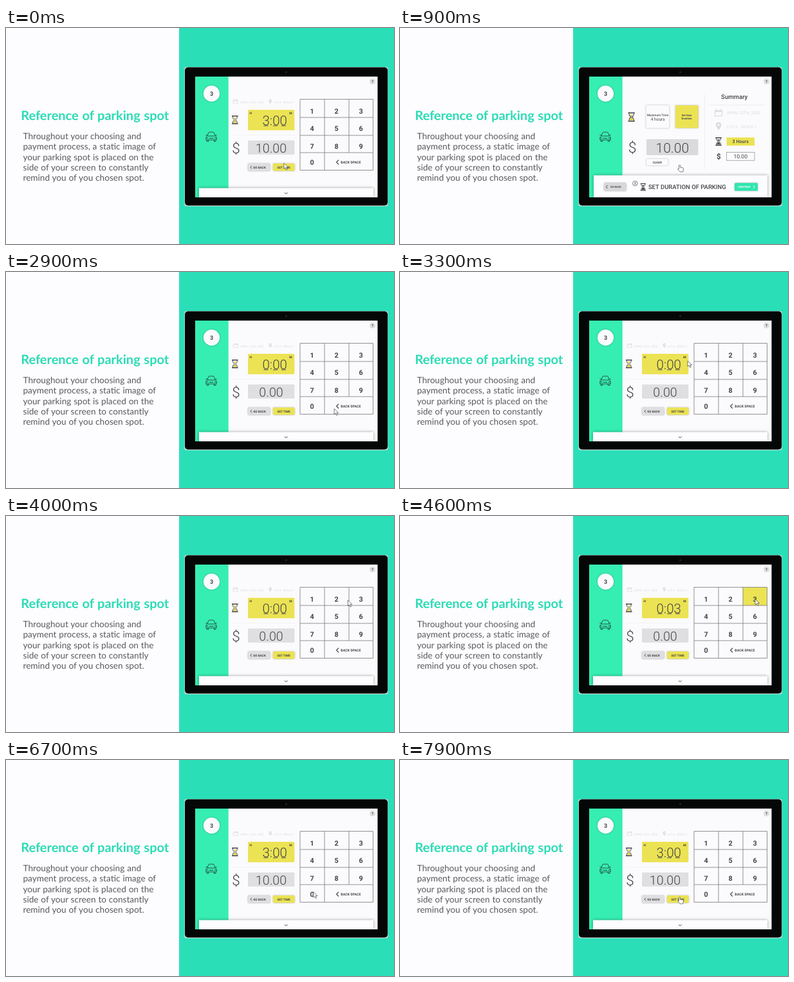
Write an HTML page that moves like this. It is 603 px wide and 338 px high and loops after 8000 ms.

```html
<!DOCTYPE html>
<html lang="en">
<head>
<meta charset="utf-8">
<title>Parking kiosk</title>
<style>
  html, body { margin: 0; width: 100%; height: 100%; overflow: hidden; background: #2adfb8; }
  svg { display: block; width: 603px; height: 338px; text-rendering: geometricPrecision; }
  text { font-family: Roboto, sans-serif; fill: #454548; }
  .copy text { font-family: Nunito, Lato, sans-serif; }
  .soft { filter: drop-shadow(.5px .8px .9px rgba(0, 0, 0, .32)); }
  .drawer { filter: drop-shadow(0 0 2px rgba(0, 0, 0, .4)); }
</style>
</head>
<body>
<svg id="stage" viewBox="0 0 603 338"></svg>
<script>
const LOOP = 8000;
const YELLOW = '#ebe353', GRAY = '#dfdee0', INK = '#454548', PALE = '#dcdcdf', GREEN = '#36eeb1', PAPER = '#fbfafc';

const rect = (x, y, w, h, fill, extra = '') =>
  `<rect x="${x}" y="${y}" width="${w}" height="${h}" fill="${fill}" ${extra}/>`;
const line = (d, color = INK, width = .8, extra = '') =>
  `<path d="${d}" fill="none" stroke="${color}" stroke-width="${width}" ${extra}/>`;
const label = (x, y, size, str, { weight = 400, anchor = 'middle', fill = INK, id = '' } = {}) =>
  `<text x="${x}" y="${y}" font-size="${size}" font-weight="${weight}" text-anchor="${anchor}"
    style="fill:${fill}" ${id && `id="${id}"`}>${str}</text>`;
const group = (inner, attrs) => `<g ${attrs}>${inner}</g>`;
const place = (x, y, scale, inner) => group(inner, `transform="translate(${x} ${y}) scale(${scale})"`);

const hourglass = (x, y, s, sand = '#d8c93c') => place(x, y, s,
  `<path d="M2 12Q2 9.5 5 7.5Q8 9.5 8 12Z M2.6 3.6H7.4L5 6.5Z" fill="${sand}"/>` +
  line('M0 .7H10M0 13.3H10', INK, 1.5) +
  line('M1.5 1V3.5Q2 5.5 4.3 7Q2 8.5 1.5 10.5V13M8.5 1V3.5Q8 5.5 5.7 7Q8 8.5 8.5 10.5V13', INK, 1));
const calendar = (x, y, s) => place(x, y, s,
  line('M.6 2H11.4V10.4H.6ZM.6 3.6H11.4M3 0V2.5M9 0V2.5', PALE, 1.3));
const pin = (x, y, s) => place(x, y, s,
  `<path d="M4 12Q0 7 0 4A4 4 0 0 1 8 4Q8 7 4 12ZM4 2.4A1.6 1.6 0 1 0 4 5.6A1.6 1.6 0 1 0 4 2.4Z"
    fill="${PALE}" fill-rule="evenodd"/>`);

function tablet() {
  return rect(277.3, 61, 316.4, 218, '#bcd8d1', 'rx="3"') +
    rect(278, 61.6, 315.2, 216.2, '#050606', 'rx="5"') +
    '<circle cx="435.5" cy="69" r="1.5" fill="#24272b"/>' +
    rect(294, 76, 283.5, 189, PAPER) +
    rect(294, 76, 51.7, 189, GREEN) +
    `<circle class="soft" cx="319.5" cy="102.7" r="12.6" fill="${PAPER}"/>` +
    label(319.5, 106, 9, '3', { weight: 700 }) +
    place(310, 162, 1,
      line('M2.6 7L4.7 2Q5 1 6.2 1H11.8Q13 1 13.3 2L15.4 7M2.6 7H15.4Q17.2 8 17.2 10V13H.8V10Q.8 8 2.6 7' +
        'ZM2 13V15.4H4.8V13M13.2 13V15.4H16V13M2.5 5.5H.4M15.5 5.5H17.6M6 10.5H12M1 9.5L4.5 10.5M17 9.5L13.5 10.5',
        '#26524a', 1)) +
    '<circle cx="569.5" cy="83.7" r="4" fill="#e3e3e5" stroke="#c4c4c7" stroke-width=".5"/>' +
    label(569.5, 85.9, 6, '?', { weight: 700 });
}

function keypad() {
  const cols = [457, 495, 533, 570.5], rows = [111.5, 140, 168, 195, 222.5];
  const key = (c, r, id) => rect(cols[c], rows[r], cols[c + 1] - cols[c], rows[r + 1] - rows[r], YELLOW, `id="${id}"`);
  let out = calendar(353, 111.5, .62) + pin(408.5, 111.5, .58) +
    label(364, 117.6, 4.5, 'APRIL 12TH, 2020', { anchor: 'start', fill: PALE }) +
    label(415.5, 117.6, 4.5, 'LOT X - SPACE 1', { anchor: 'start', fill: PALE }) +
    hourglass(351, 137, .96) +
    rect(376, 128, 72.3, 32, YELLOW, 'rx="1.5"') +
    label(380.3, 134.8, 5, 'H', { weight: 700 }) + label(442.5, 134.8, 5, 'M', { weight: 700 }) +
    label(417.7, 152, 20.6, '', { weight: 300, id: 'time' }) +
    line('M400.5 153H407.5M415 153H422M428 153H435', INK, .9) +
    line('M352 167.5H449', '#eeeef0', .6) +
    label(357.5, 196, 22.5, '$', { weight: 300 }) +
    rect(376, 176, 72.3, 22, GRAY, 'rx="1.5"') +
    label(412, 194.6, 19.7, '', { weight: 300, id: 'price' }) +
    rect(376, 212, 34.5, 11.6, GRAY, 'rx="1.5" class="soft"') +
    line('M382 215.8L380 218L382 220.2', INK, .9) +
    label(394, 219.9, 4.7, 'GO BACK', { weight: 700 }) +
    rect(415, 212, 33.5, 11.6, YELLOW, 'rx="1.5" class="soft"') +
    label(431.7, 219.9, 4.7, 'SET TIME', { weight: 700 }) +
    key(2, 0, 'three') + key(0, 3, 'zero') +
    line(rows.map(y => `M457 ${y}H570.5`).join('') +
      'M457 111.5V222.5M495 111.5V222.5M533 111.5V195M570.5 111.5V222.5', '#77777b', .8);
  for (let n = 1; n <= 9; n++) {
    const c = (n - 1) % 3, r = (n - 1 - c) / 3;
    out += label(475.7 + 38 * c, 134.3 + 27.1 * r, 10.8, n, { weight: 600 });
  }
  return out + label(475.7, 214.4, 10.8, '0', { weight: 600 }) +
    line('M517 206.5L513.5 210L517 213.5', INK, 1.1) +
    label(520.3, 211.7, 5.3, 'BACK SPACE', { weight: 700, anchor: 'start' }) +
    group(rect(300, 250.5, 271, 14.5, '#fdfcfe'), 'class="drawer" clip-path="url(#screen)"') +
    line('M433 257.5L435.3 259.6L437.6 257.5', INK, 1);
}

function summary() {
  return hourglass(354.5, 132, 1.04) +
    rect(382.5, 121, 36, 35.5, PAPER, 'rx="1" class="soft"') +
    label(400.5, 137.7, 4.75, 'Maximum Time', { weight: 500 }) + label(400.7, 145, 6.6, '4 hours') +
    rect(428, 121, 35.5, 35.5, YELLOW, 'rx="1" class="soft"') +
    label(445.6, 137.6, 4.2, 'Set Own', { weight: 600 }) + label(445.6, 142.9, 4.2, 'Duration', { weight: 600 }) +
    label(361.2, 195.2, 23, '$', { weight: 300 }) +
    rect(383, 174, 80.5, 25, '#dad9db', 'rx="2"') +
    label(423.3, 194.6, 21, '10.00', { weight: 300 }) +
    rect(383, 205, 33.5, 10, PAPER, 'rx="1" class="soft"') +
    label(399.8, 211.7, 4.6, 'CLEAR', { weight: 700 }) +
    line('M473.5 104V221M481 120.5H567', '#e9e9eb', .7) +
    label(519.7, 111.4, 9.6, 'Summary', { weight: 500 }) +
    calendar(489, 127, 1.02) + pin(491, 147.5, 1.03) +
    label(508, 135.3, 6.4, 'APRIL 12TH, 2020', { anchor: 'start', fill: PALE }) +
    label(508, 156.6, 6.4, 'LOT X - SPACE 1', { anchor: 'start', fill: PALE }) +
    hourglass(490.3, 171, .95, INK) +
    rect(507.5, 171.3, 43.5, 12.7, YELLOW) + label(529.2, 180.3, 7.2, '3 Hours', { weight: 500 }) +
    label(495.3, 205, 11.5, '$', { weight: 600 }) +
    rect(507.5, 194.6, 43.5, 12.6, PAPER, 'stroke="#88888c" stroke-width=".7"') +
    label(529.2, 203.9, 8.6, '10.00') +
    group(rect(301, 230.5, 270, 34.5, '#fdfcfe'), 'class="drawer" clip-path="url(#screen)"') +
    rect(317, 242.3, 34.5, 12.6, '#d8d7d9', 'rx="1.5" class="soft"') +
    line('M322.5 246L320.3 248.5L322.5 251', INK, 1) +
    label(335.5, 250, 4, 'GO BACK', { weight: 700 }) +
    `<circle cx="365.4" cy="243.2" r="3.8" fill="none" stroke="${INK}" stroke-width=".7"/>` +
    label(365.4, 245.2, 5.2, '2', { weight: 600 }) +
    hourglass(373.7, 243, .83, INK) +
    label(446.3, 251.7, 9.5, 'SET DURATION OF PARKING', { weight: 500 }) +
    rect(520, 242.6, 36, 12.2, '#2fe6ae', 'rx="1.5" class="soft"') +
    label(535, 250.1, 4, 'CONTINUE', { weight: 700, fill: '#fdfcfe' }) +
    line('M548.8 246.2L551.2 248.7L548.8 251.2', '#fdfcfe', 1);
}

const title = `<text x="23.2" y="144" font-size="20" font-weight="700" word-spacing=".8"
  style="fill:#2adcb5">Reference of parking spot</text>`;
const body = ['Throughout your choosing and', 'payment process, a static image of',
  'your parking spot is placed on the', 'side of your screen to constantly', 'remind you of you chosen spot.']
  .map((str, i) => `<text x="26.5" y="${174 + 16.3 * i}" font-size="13.6" word-spacing=".4"
    style="fill:#5a595d">${str}</text>`).join('');

const stage = document.getElementById('stage');
stage.innerHTML = `<clipPath id="screen">${rect(294, 76, 283.5, 189, '#000')}</clipPath>` +
  rect(0, 0, 603, 338, '#2adfb8') + rect(0, 0, 269, 338, '#fdfcfe') +
  group(title + body, 'class="copy"') + tablet() +
  group(keypad(), 'id="keypad"') + group(summary(), 'id="summary"') +
  group(
    `<path id="arrow" d="M0 0V9L2.1 7.1L3.6 10.4L5.2 9.7L3.7 6.5H6.5Z" fill="#fff" stroke="#444" stroke-width=".7"/>
     <path id="hand" d="M1 1Q2.2 -.5 3.2 1V4.2L7.2 5Q8.3 5.4 8.1 6.8L7.2 11H2.8L-.8 7.2Q-.8 5.8 1 6.6Z"
       fill="#fff" stroke="#444" stroke-width=".7"/>`, 'id="cursor"');

const el = Object.fromEntries([...stage.querySelectorAll('[id]')].map(n => [n.id, n]));

// [start ms, view, time, price, pressed key]
const states = [
  [0, 'keypad', '3:00', '10.00', ''],
  [300, 'summary', '3:00', '10.00', ''],
  [2700, 'keypad', '0:00', '0.00', ''],
  [4300, 'keypad', '0:03', '0.00', 'three'],
  [4900, 'keypad', '0:03', '0.00', ''],
  [5300, 'keypad', '0:30', '0.00', 'zero'],
  [6200, 'keypad', '3:00', '10.00', 'zero'],
  [6700, 'keypad', '3:00', '10.00', '']
];
// [ms, x, y, shape from here on]
const path = [
  [0, 432, 211.5, 'arrow'], [200, 432.5, 213, 'hand'], [1000, 432.5, 214, 'hand'],
  [1900, 537.5, 246.5, 'hand'], [2700, 537.5, 246.5, 'arrow'], [3250, 447, 139, 'arrow'],
  [3500, 447, 139, 'arrow'], [4200, 552, 130, 'arrow'], [4800, 552, 130, 'arrow'],
  [5250, 477.5, 206, 'hand'], [6700, 477.5, 206, 'arrow'], [7500, 432.5, 214, 'hand'],
  [LOOP, 432.5, 214, 'hand']
];
const ease = p => p * p * (3 - 2 * p);
const show = (node, on) => { node.style.display = on ? '' : 'none'; };

function draw(t) {
  const [, view, time, price, pressed] = states.findLast(s => s[0] <= t);
  show(el.keypad, view === 'keypad');
  show(el.summary, view === 'summary');
  el.time.textContent = time;
  el.price.textContent = price;
  show(el.three, pressed === 'three');
  show(el.zero, pressed === 'zero');

  const i = path.findLastIndex(p => p[0] <= t);
  const [t0, x0, y0, shape] = path[i], [t1, x1, y1] = path[i + 1];
  const p = ease((t - t0) / (t1 - t0));
  el.cursor.setAttribute('transform', `translate(${x0 + (x1 - x0) * p} ${y0 + (y1 - y0) * p})`);
  show(el.arrow, shape === 'arrow');
  show(el.hand, shape === 'hand');
}

const start = performance.now();
function tick() {
  draw((performance.now() - start) % LOOP);
  requestAnimationFrame(tick);
}
tick();
</script>
</body>
</html>
```
